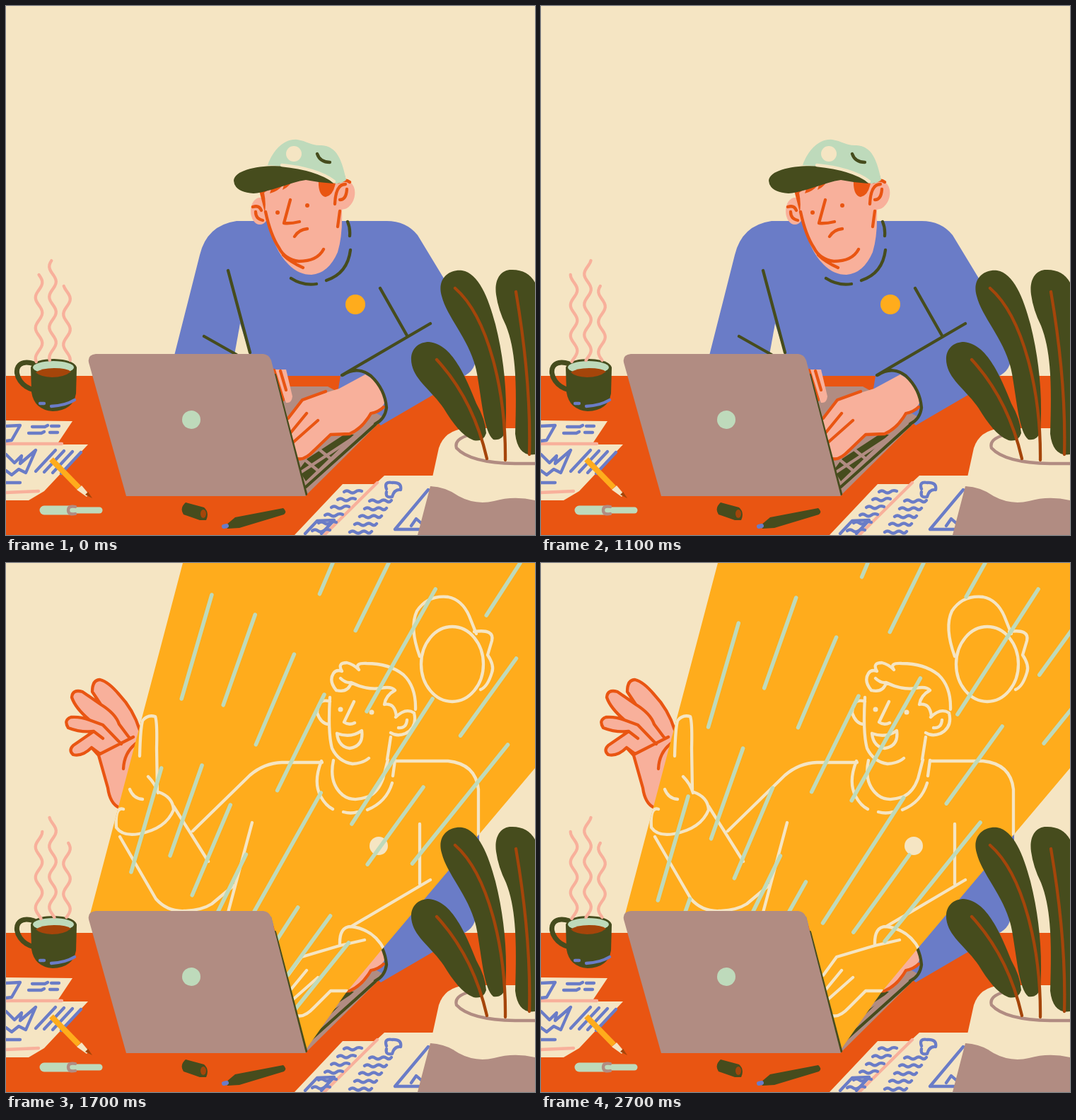
An HTML page that plays this animation: 748x748 px, repeating every 2.8 s.

```html
<!DOCTYPE html>
<html lang="en">
<head>
<meta charset="utf-8">
<title>Video call daydream</title>
<style>
  html, body { margin: 0; width: 100%; height: 100%; overflow: hidden; background: #f5e5c3; }
  svg { display: block; width: 100vw; height: 100vh; }
  .cream { color: #f5e5c3; } .red { color: #e95512; } .blue { color: #6a7cc7; } .skin { color: #f8b09b; }
  .dark { color: #464c1d; } .mint { color: #bedabb; } .mauve { color: #b18c82; } .gold { color: #ffac1c; }
  .brown { color: #a5450a; }
  svg * { fill: currentColor; }
  svg .line { fill: none; stroke: currentColor; stroke-width: 4.3; stroke-linecap: round; stroke-linejoin: round; }
</style>
</head>
<body>
<svg viewBox="0 0 748 748">
  <clipPath id="beamShape"><path id="beam" d="M250 0H748V290L531 547L482 606L424 688L375 500H118Z"/></clipPath>
  <rect class="cream" width="748" height="748"/>
  <rect class="red" y="523" width="748" height="225"/>

  <g id="man">
    <path class="blue" d="M238 494L274 352Q284 310 326 304H538Q566 304 582 324L622 390L663 496Q666 512 650 522L602 551L530 593L470 541L473 523H340Z"/>
    <path class="cream" d="M331 449L345 493H323Z"/>
    <path class="line dark" d="M314 374L345 490M280 467L326 493M529 399L567 466"/>
    <circle class="gold" cx="494" cy="422" r="14"/>
    <ellipse class="skin" cx="359" cy="290" rx="13" ry="19"/>
    <path class="skin" d="M357 252L370 300Q378 345 400 366Q414 380 432 380Q456 378 469 348Q476 325 475 290L480 240H365Z"/>
    <ellipse class="skin" cx="477" cy="267" rx="16" ry="21" transform="rotate(14 477 267)"/>
    <path class="red" d="M357 257L366 292Q368 278 365 264L376 256L373 265Q386 262 394 250L391 260Q400 256 405 247L420 244L360 248ZM442 246Q441 268 452 270Q463 268 466 250Z"/>
    <path class="line red" d="M349 284Q358 281 361 289M353 291Q353 301 363 303M367 291Q374 324 386 342Q394 358 414 361Q440 361 449 344M392 352Q402 362 420 370M472 290L469 312M465 280Q466 252 480 252M472 274Q481 274 482 259M402 274L393 307Q402 308 415 305M408 326Q414 316 426 315M470 249Q480 244 486 249"/>
    <circle class="red" cx="384" cy="292" r="3"/><circle class="red" cx="426" cy="282" r="3"/>
    <path class="mint" d="M370 225C378 203 394 187 412 189C426 191 432 198 446 197C468 198 475 218 481 246Q472 253 462 250Q430 228 370 225Z"/>
    <path class="dark" d="M322 247C323 231 362 224 396 227C428 229 452 239 463 251Q444 250 424 246C402 249 374 263 350 265Q323 263 322 247Z"/>
    <path class="line cream" d="M390 225Q440 230 464 248"/>
    <circle class="cream" cx="407" cy="209" r="11"/>
    <path class="line dark" d="M440 209Q444 221 458 221M403 385Q420 396 439 393M453 388Q483 378 487 345M486 325Q487 314 483 305"/>

    <path class="mauve" d="M385 538H455L535 582L424 692Z"/>
    <path class="skin" d="M377 514H396L405 552Q404 562 396 561Z"/>
    <path class="line red" d="M379 515L392 557M388 516L396 543"/>
    <path class="dark" d="M414 656L426 640L478 606H492L424 672Z"/>
    <path class="line mauve" d="M416 660L492 610M424 643L440 656M444 628L460 641"/>
    <path class="line dark" d="M424 680L522 592"/>
    <path class="skin" d="M397 586L419 557L471 541L508 521Q532 534 536 558Q533 571 516 576Q505 596 486 605L457 606Q432 636 418 642L411 640Z"/>
    <path class="line red" d="M399 583L419 557L452 545M402 604L425 576M406 617L441 586M412 640Q422 643 436 628L459 606L486 605Q504 597 516 576Q527 574 534 567"/>
    <path class="line dark" d="M475 522L600 449M476 522Q497 508 516 523Q536 542 538 568Q536 584 522 591"/>
  </g>

  <g id="call">
    <path class="blue" d="M669 380V412H640Z"/>
    <path class="skin" d="M160 346Q147 340 144 318L131 272L121 261Q108 274 95 271Q88 265 95 258L124 238Q105 240 88 233Q81 222 92 218Q105 217 118 222Q98 205 93 190Q94 178 108 182L134 200L122 182Q122 165 133 165Q145 168 160 186Q180 207 189 236L200 346Z"/>
    <path class="line red" d="M160 346Q147 340 144 318L131 272L121 261Q108 274 95 271Q88 265 95 258L124 238Q105 240 88 233Q81 222 92 218Q105 217 118 222Q98 205 93 190Q94 178 108 182L134 200L122 182Q122 165 133 165Q145 168 160 186Q180 207 189 236M134 200Q155 213 160 228L175 248M118 222L137 229L163 256M124 238L137 248M121 261L133 270L180 246M184 255Q167 268 166 291"/>
    <use class="gold" href="#beam"/>
    <g clip-path="url(#beamShape)">
      <path class="line cream" d="M189 273Q190 235 193 223Q200 214 211 217Q214 225 213 262L214 322M201 302Q211 312 215 325M175 320Q180 333 193 334
        M166 348Q154 344 156 374Q165 387 188 383Q226 376 237 349Q236 331 216 324
        M161 387L212 475Q228 493 252 492Q277 491 291 482L322 456M237 344L286 422M264 379L345 300Q365 283 390 282H447
        M348 367L314 494M552 280H625Q664 284 668 320V384M585 369V454M488 514L600 448M472 540Q471 514 488 514Q520 518 535 547
        M399 583L418 557L472 541L507 533M402 604L425 576M406 617L441 586M412 640Q422 643 436 628L459 605H482"/>
      <path class="line cream" d="M467 180Q456 167 463 156Q467 150 475 153Q468 141 482 141Q491 143 499 151Q492 141 510 142Q542 142 562 158Q580 175 579 207
        M467 180Q484 184 488 169Q480 170 473 163M488 169Q510 180 530 177Q545 174 550 180Q537 187 535 200Q550 197 552 217
        M458 190Q455 240 461 262Q470 281 490 284Q505 283 513 276M458 196Q441 190 440 212Q445 227 456 228
        M551 218Q565 204 577 212Q582 232 565 241Q553 246 544 240M555 233Q566 234 567 222M544 246L539 278
        M492 196L478 225Q485 230 493 226M468 241Q488 248 503 237Q506 259 486 262Q470 260 468 241
        M446 280Q434 310 445 330Q452 343 462 348M477 352Q488 355 497 352M511 349Q538 338 546 311M550 279L547 301
        M463 279Q456 311 476 328Q490 339 513 330Q526 324 533 305L540 278"/>
      <path class="line cream" d="M585 132Q570 91 581 68Q596 45 625 48Q645 52 655 75L665 100M662 97Q691 93 687 110L681 130Q691 145 687 155Q681 175 671 179"/>
      <ellipse class="line cream" cx="631" cy="143" rx="44" ry="53"/>
      <circle class="cream" cx="473" cy="207" r="3.5"/><circle class="cream" cx="517" cy="211" r="3.5"/>
      <circle class="cream" cx="527" cy="400" r="13"/>
      <g id="streaks"></g>
    </g>
  </g>

  <path class="line dark" d="M380 522L424 690"/>
  <path class="mauve" d="M127 492H364Q372 493 375 501L424 693H170L117 504Q115 493 127 492Z"/>
  <circle class="mint" cx="262" cy="585" r="13"/>

  <path class="line dark" style="stroke-width:7" d="M40 506C16 498 10 516 20 530Q27 540 40 543"/>
  <path class="dark" d="M35 511Q40 499 68 499Q96 500 100 511L99 548Q95 572 66 573Q40 571 36 546Z"/>
  <ellipse class="mint" cx="67" cy="511" rx="29" ry="9"/>
  <path class="brown" d="M42 518Q50 512 68 512Q86 512 92 517Q82 525 65 525Q48 524 42 518Z"/>
  <path class="line blue" d="M48 562H54M64 566Q84 565 97 557"/>
  <g id="steam"></g>

  <path class="cream" d="M0 586L94 587L74 617L0 619ZM0 620H116L54 686L32 699H0Z"/>
  <path class="cream" d="M408 748L476 676H522L535 664H612V748Z"/>
  <path class="line skin" d="M0 619H79M0 688L46 686M450 748L525 674"/>
  <path class="line blue" d="M0 594L20 593L8 614L0 615M0 634L12 646L22 636L20 647L42 628L28 660L18 655L8 663L0 657M0 674H20
    M423 746L440 728L464 727L446 746M538 683Q534 672 546 674Q560 673 558 684Q549 683 546 694Q536 696 538 687M597 684L550 740H592M573 735L580 725L588 732"/>
  <g id="writing"></g>
  <path class="line gold" style="stroke-width:8;stroke-linecap:butt" d="M64 641L103 681"/>
  <path class="cream" d="M100 684L107 678L117 690L114 694Z"/>
  <path class="brown" d="M112 691L116 687L122 696Z"/>
  <path class="line mint" style="stroke-width:13" d="M54 713H92"/>
  <path class="line mint" style="stroke-width:9" d="M92 713H132"/>
  <path class="line mauve" d="M98 708Q88 706 88 713T98 718"/>
  <path class="dark" d="M254 702L280 709Q288 716 283 727L274 727L251 719Q245 710 254 702Z"/>
  <ellipse class="brown" cx="279" cy="718" rx="4" ry="6"/>
  <path class="dark" d="M311 734L324 723L392 710Q398 715 393 719L330 738L313 739Z"/>
  <path class="line blue" style="stroke-width:6" d="M308 736L312 735"/>

  <path class="cream" d="M603 666L612 625Q620 600 650 597H748V748H590Z"/>
  <path class="mauve" d="M600 679Q622 680 640 693Q664 706 690 700Q718 692 748 699V748H582Z"/>
  <path class="line mauve" d="M657 606Q633 612 637 625Q656 646 720 647H748"/>
  <path class="dark" d="M616 410C609 386 626 372 645 374C668 378 682 412 692 450C706 505 709 560 706 600Q703 615 689 613C676 602 673 560 666 520C658 474 624 442 616 410Z"/>
  <path class="dark" d="M693 408C690 386 700 372 716 373Q738 373 748 391V634Q724 638 720 605C722 540 722 490 707 452Q696 430 693 408Z"/>
  <path class="dark" d="M574 508C569 487 582 475 598 475C630 478 648 520 665 562Q678 585 679 604Q675 617 661 614C644 607 632 590 619 569C603 545 579 530 574 508Z"/>
  <path class="line brown" d="M635 399C682 440 707 545 706 642M721 404C734 480 742 560 740 634M609 500C646 540 668 588 680 640"/>
</svg>

<script>
const STEP = 100, FRAMES = 28, CALL_START = 12;
const get = id => document.getElementById(id);

function addLine(parent, color, attributes) {
  const el = document.createElementNS("http://www.w3.org/2000/svg", "path");
  el.setAttribute("class", "line " + color);
  for (const name in attributes) el.setAttribute(name, attributes[name]);
  return get(parent).appendChild(el);
}

// Rows of handwriting: each row starts (dx, dy) after the one before.
function write(count, x, y, dx, dy, stroke) {
  for (let i = 0; i < count; i++)
    addLine("writing", "blue", { d: `M${x + i * dx} ${y + i * dy}${stroke}` });
}
const wave = "q4 -3 8 0t8 0t8 0t7 -1";
write(6, 478, 687, -9, 11, "q4 -3 8 0t8 0t9 -1");
write(5, 514, 700, -7, 11, wave);
write(2, 37, 595, -5, 9, "h18l4 -2");
write(2, 64, 594, -2, 9, "h11");
write(4, 70, 628, 12, 1, "l-28 30");

// Wavy strands drift upward, a quarter wave per step.
const strands = [
  { x: 46.5, top: 380, phase: 0 },
  { x: 66, top: 360, phase: 3.5 },
  { x: 86, top: 396, phase: -1.1 }
].map(strand => ({ ...strand, el: addLine("steam", "skin") }));

function drawSteam(frame) {
  for (const { x, top, phase, el } of strands) {
    const points = [];
    for (let y = top; y <= 503; y += 3) {
      const angle = phase + (y - top) * 2 * Math.PI / 43 + frame * Math.PI / 2;
      points.push([x + 4.8 * Math.sin(angle), y]);
    }
    el.setAttribute("d", "M" + points.join("L"));
  }
}

// Dashes rise along fanned lanes; lengths are measured by height.
const RISE = 45, DASH = .6, HEIGHT = 748;
const lanes = [
  { x: 304, start: 220, period: 245 },
  { x: 378, start: 184, period: 213 },
  { x: 462, start: 240, period: 213 },
  { x: 541, start: 323, period: 226 },
  { x: 628, start: 298, period: 288 },
  { x: 727, start: 172, period: 295 },
  { x: 819, start: 184, period: 182 },
  { x: 916, start: 222, period: 280 }
].map(({ x, start, period }) => {
  const slope = .036 + .000838 * x;
  const el = addLine("streaks", "mint", {
    d: `M${x} 0L${x - slope * HEIGHT} ${HEIGHT}`,
    pathLength: HEIGHT,
    "stroke-dasharray": [period * DASH, period * (1 - DASH)],
    style: "stroke-width:5.5"
  });
  return { start, el };
});

function drawStreaks(frame) {
  for (const { start, el } of lanes)
    el.setAttribute("stroke-dashoffset", RISE * (frame - 2 * CALL_START) - start);
}

function draw(now) {
  const frame = Math.floor(now / STEP) % FRAMES;
  get("call").style.display = frame < CALL_START ? "none" : "";
  drawSteam(frame);
  drawStreaks(frame);
  requestAnimationFrame(draw);
}
draw(0);
</script>
</body>
</html>
```
